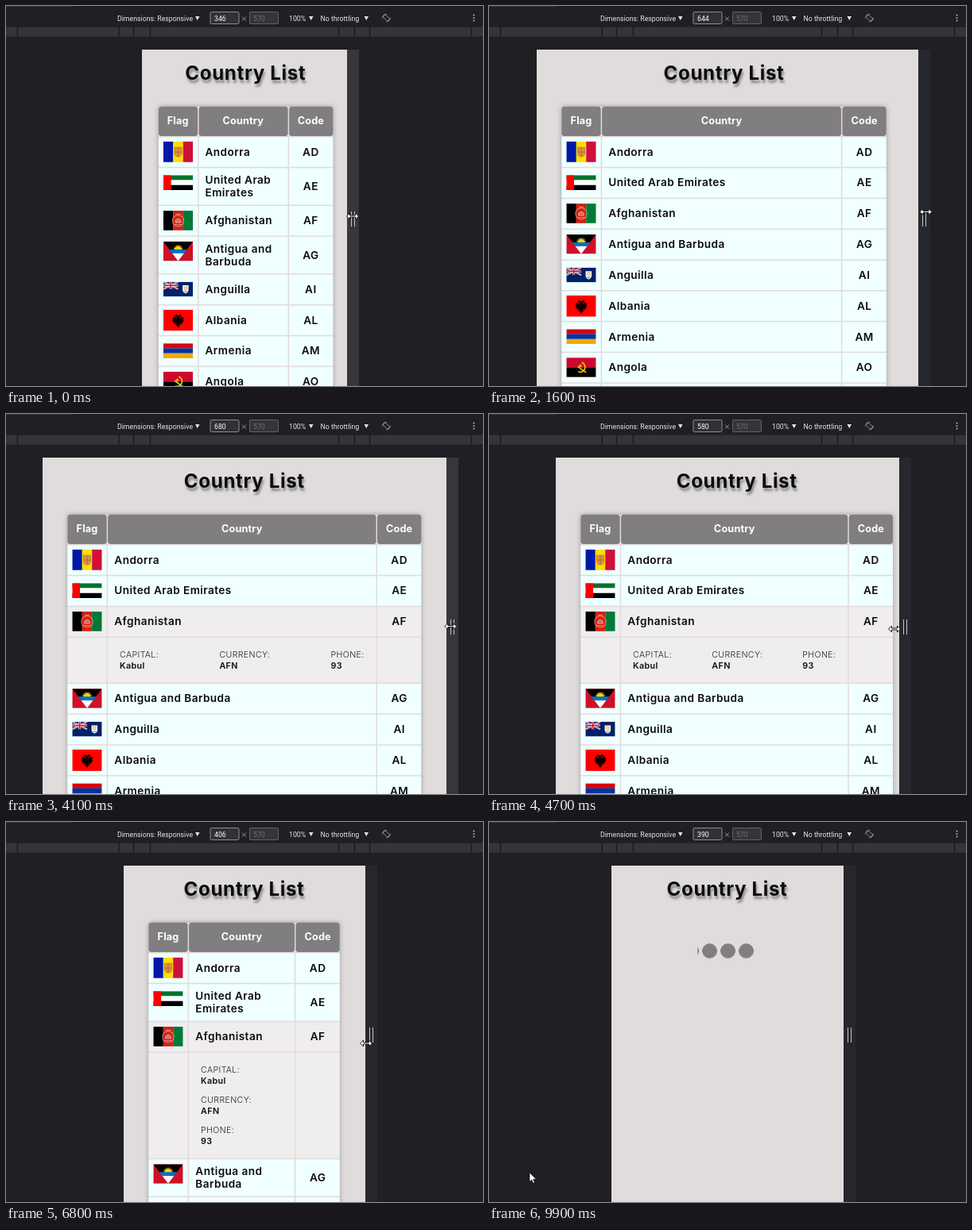
Animation of 600x479 px, one loop 10 s. Source, as an HTML page:

```html
<!DOCTYPE html>
<html lang="en">
<head>
<meta charset="utf-8">
<title>Country List</title>
<style>
  html, body { margin: 0; width: 100%; height: 100%; overflow: hidden; background: #201f24; }
  #stage { position: relative; width: 600px; height: 479px; overflow: hidden; background: #201f24; }
  #bar { position: absolute; left: 0; top: 0; font: 8.75px Roboto, sans-serif; }
  #panel { position: absolute; top: 55px; height: 424px; overflow: hidden; background: #e0dcdb; }
  #page { position: relative; transform: scale(.7465); transform-origin: 0 0; height: 570px;
    font: 600 18.2px/21px Inter, sans-serif; letter-spacing: .6px; color: #0c0c0e; }
  h1 { position: absolute; top: 20px; width: 100%; margin: 0; text-align: center; white-space: nowrap;
    font-size: 32.4px; line-height: 40px; font-weight: 700; letter-spacing: .8px;
    text-shadow: 2px 5px 4px rgba(50, 55, 70, .5); }
  #list { position: absolute; top: 95.5px; display: grid; gap: 2px; box-shadow: 0 0 9px rgba(0, 0, 0, .3); border-radius: 5px; }
  .row { display: grid; grid-template-columns: 66px minmax(0, 1fr) 74px; gap: 2px; }
  .row > div { min-height: 50px; box-sizing: border-box; background: #f0ffff; display: flex; align-items: center; }
  .row > .flag { align-items: flex-start; justify-content: center; }
  .flag span { height: 50px; display: flex; align-items: center; }
  .row > .name { padding: 10px 8px 10px 11px; }
  .row > .code { justify-content: center; }
  .head > div { background: #807e81 !important; color: #fff; border-radius: 5px; justify-content: center;
    font-weight: 700; font-size: 17px; letter-spacing: .2px; }
  .open > div, .info > div { background: #efedee; }
  .hover > div { background: #d0e7ee; }
  .row > .facts { padding: 20px; flex-wrap: wrap; justify-content: space-between; align-content: flex-start; gap: 15px;
    font-size: 14.4px; line-height: 18px; letter-spacing: .5px; }
  .facts small { display: block; font-size: 14.2px; font-weight: 300; color: #222; }
  #loader { position: absolute; top: 131px; left: 50%; width: 100px; height: 26px; margin-left: -50px;
    background: radial-gradient(circle 12.7px, #807e81 96%, transparent) 0 0 / 30.8px 26px; }
  #grip { position: absolute; top: 55px; width: 15px; height: 424px; }
  #grip::after { content: ""; position: absolute; left: 5px; top: 204px; width: 3px; height: 19px;
    border: solid #c4c6c8; border-width: 0 1px; }
  #pointer { position: absolute; left: 0; top: 0; overflow: visible; }
</style>
</head>
<body>
<div id="stage">
  <svg id="bar" width="600" height="55">
    <path d="M0 0H85" stroke="#2e2f33" stroke-width="2"/>
    <path d="M85 0H600" stroke="#19191c" stroke-width="2"/>
    <rect y="26.5" width="600" height="12" fill="#333539"/>
    <path d="M14.500 26V39M142 26V39M160.500 26V39M181.500 26V39M418.500 26V39M438.500 26V39M457.500 26V39M585.500 26V39" stroke="#1b1b1f" stroke-width="1.5"/>
    <g fill="#e4e6e8">
      <text x="140" y="18.5">Dimensions: Responsive</text>
      <text x="356" y="18.5">100%</text>
      <text x="395.5" y="18.5">No throttling</text>
      <path d="M238 13h5.500l-2.750 5zM381 13h5.500l-2.750 5zM450.500 13h5.500l-2.750 5z"/>
    </g>
    <rect x="257" y="7.5" width="36" height="15" rx="1.5" fill="#303135" stroke="#8c8d90"/>
    <rect x="306.5" y="7.5" width="36" height="15" rx="1.5" fill="#353539" stroke="#626266"/>
    <text id="size" x="262" y="18.5" fill="#fff"></text>
    <text x="311" y="18.5" fill="#707074">570</text>
    <path d="M297 13.500l5 5m0-5l-5 5" stroke="#96989b"/>
    <g fill="none" stroke="#9b9da0" stroke-width=".9">
      <rect x="476.3" y="11" width="4.400" height="8" rx="1" transform="rotate(-45 478.5 15)"/>
      <path d="M473.700 15.500a4.800 4.800 0 0 1 5-5.300M483.300 14.500a4.800 4.800 0 0 1-5 5.300"/>
    </g>
    <g fill="#b5b7ba"><circle cx="588.5" cy="11.5" r="1"/><circle cx="588.5" cy="15" r="1"/><circle cx="588.5" cy="18.5" r="1"/></g>
  </svg>
  <div id="panel">
    <div id="page">
      <h1>Country List</h1>
      <div id="list"></div>
      <div id="loader"></div>
    </div>
  </div>
  <div id="grip"></div>
  <svg id="pointer" width="1" height="1">
    <path id="resize" d="M-7.500 0l4-4v3h7v-3l4 4-4 4v-3h-7v3z" fill="#fff" stroke="#000" stroke-width=".9" stroke-linejoin="round"/>
    <circle id="touch" r="8" fill="rgba(92,98,104,.8)" stroke="rgba(130,140,146,.75)" stroke-width="1.5"/>
    <path id="arrow" d="M0 0v11.500l2.700-2.500 1.900 4.200 1.900-.9-1.900-4h3.700z" fill="#fff" stroke="#000" stroke-width=".6"/>
  </svg>
</div>
<script>
const $ = id => document.getElementById(id);
const SCALE = 0.7465, LOOP = 10000, STEP = 100, LAG = 130;

// Flag drawing
const rect = (x, y, w, h, fill) => `<rect x="${x}" y="${y}" width="${w}" height="${h}" fill="${fill}"/>`;
const disc = (x, y, r, fill, more = '') => `<circle cx="${x}" cy="${y}" r="${r}" fill="${fill}" ${more}/>`;
const path = (d, fill, more = '') => `<path d="${d}" fill="${fill}" ${more}/>`;
const bars = (...c) => c.map((f, i) => rect(i * 50 / c.length, 0, 50 / c.length + .1, 40, f)).join('');
const bands = (h, ...c) => c.map((f, i) => rect(0, i * h / c.length, 50, h / c.length + .1, f)).join('');
const star = (n, x, y, R, r, fill) => {
  const pts = Array.from({ length: 2 * n }, (_, i) => {
    const a = Math.PI * i / n - Math.PI / 2, d = i % 2 ? r : R;
    return `${(x + d * Math.cos(a)).toFixed(1)},${(y + d * Math.sin(a)).toFixed(1)}`;
  });
  return `<polygon points="${pts.join(' ')}" fill="${fill}"/>`;
};
const line = (color, width) => `stroke="${color}" stroke-width="${width}"`;
const flag = (h, art) => `<svg width="50" height="${h}" viewBox="0 0 50 ${h}">${art}</svg>`;

const flags = {
  AD: flag(35, bars('#0018a8', '#fedd00', '#d0103a') +
    path('M19 10h12v10q0 5-6 6-6-1-6-6z', '#d69a3c', line('#b9752f', 1.2)) + path('M25 11v14M20 18h10', 'none', line('#c7503c', 1.2))),
  AE: flag(25, bands(25, '#00732f', '#fff', '#000') + rect(0, 0, 13, 25, '#f00')),
  AF: flag(33, bars('#000', '#d32011', '#007a36') +
    disc(25, 17, 9.5, 'none', line('#ec9c92', 1.6) + ' stroke-dasharray="2 .8"') +
    path('M20.500 20v-4q4.500-5 9 0v4zM19 23.500h12M21 6h8', '#dd6a5e', line('#f3c4bd', .9))),
  AG: flag(33, rect(0, 0, 50, 33, '#ce1126') + '<clipPath id="vee"><path d="M0 0H50L25 33z"/></clipPath><g clip-path="url(#vee)">' +
    rect(0, 0, 50, 14, '#000') + star(16, 25, 14, 9.5, 5.5, '#fcd116') +
    rect(0, 13.5, 50, 7, '#0072c6') + rect(0, 20, 50, 13, '#fff') + '</g>'),
  AI: flag(25, rect(0, 0, 50, 25, '#012169') +
    path('M0 0L25 12.500M25 0L0 12.500', 'none', line('#fff', 2.6)) + path('M0 0L25 12.500M25 0L0 12.500', 'none', line('#c8102e', .9)) +
    path('M12.500 0V12.500M0 6.250H25', 'none', line('#fff', 4)) + path('M12.500 0V12.500M0 6.250H25', 'none', line('#c8102e', 2.2)) +
    path('M32.500 6h10v7q0 5-5 7-5-2-5-7z', '#fff') + path('M34 15h7q-1 3-3.500 4-2.500-1-3.500-4z', '#7ec4dc') +
    disc(37.5, 10.5, 2.4, 'none', line('#f19b32', 1.4))),
  AL: flag(36, rect(0, 0, 50, 36, '#f00') +
    path('M25 11l-3-3-4 3 4 1 1 3-4-3-4 2 2 2-2 2 2 2-1 2 3 0-1 3 4-2-1 4 2 0 2 4 2-4 2 0-1-4 4 2-1-3 3 0-1-2 2-2-2-2 2-2-4-2-4 3 1-3 4-1-4-3z', '#120000')),
  AM: flag(25, bands(25, '#d90012', '#0033a0', '#f2a800')),
  AO: flag(33, bands(33, '#cc092f', '#000') +
    path('M26 8a8.500 8.500 0 1 1-6 16M19 15l14 10', 'none', line('#ffcb00', 2.2)) + star(5, 23.5, 14, 3.6, 1.5, '#ffcb00')),
  AQ: flag(33, rect(0, 0, 50, 33, '#3a7dce') + disc(25, 17, 8, '#fff')),
};

const names = ['Andorra', 'United Arab Emirates', 'Afghanistan', 'Antigua and Barbuda', 'Anguilla',
  'Albania', 'Armenia', 'Angola', 'Antarctica'];
const row = (cls, a, b, c) => `<div class="row ${cls}">${a}${b}${c}</div>`;
const cell = (cls, html) => `<div class="${cls}">${html}</div>`;
const fact = (label, value) => `<span><small>${label}:</small>${value}</span>`;

$('list').innerHTML = row('head', cell('', 'Flag'), cell('', 'Country'), cell('', 'Code')) +
  Object.keys(flags).map((code, i) =>
    row(code, cell('flag', `<span>${flags[code]}</span>`), cell('name', names[i]), cell('code', code)) +
    (code === 'AF' ? row('info', cell('', ''), cell('facts', fact('CAPITAL', 'Kabul') + fact('CURRENCY', 'AFN') + fact('PHONE', '93')), cell('', '')) : '')
  ).join('');
const picked = document.querySelector('.AF'), info = document.querySelector('.info');

// Motion: [time, value...]
const widths = [[-130, 349], [0, 346], [100, 350], [770, 526], [900, 558], [1100, 595], [1900, 673], [2150, 680],
  [4150, 680], [4400, 656], [4570, 610], [4700, 580], [5100, 520], [5570, 470], [5700, 444], [6100, 420], [6500, 406],
  [6900, 406], [7500, 390]];
const trail = [[0, 436, 265], [100, 440, 264], [900, 525, 258], [1100, 537, 257], [2100, 562, 262], [2300, 561, 266],
  [2500, 450, 80], [2700, 375, 249], [3400, 375, 249], [3700, 430, 255], [4000, 560, 267], [4150, 559, 268],
  [4400, 545, 269], [4700, 510, 271], [5700, 465, 277], [6500, 453, 279], [6900, 453, 279], [7700, 447, 281],
  [8000, 380, 340], [8350, 110, 440], [8600, 80, 250], [8800, 74, -20], [9500, 70, -20], [9900, 51, 442]];

function at(keys, t) {
  const n = keys.findIndex(k => k[0] > t);
  if (n < 0) return keys[keys.length - 1].slice(1);
  if (n === 0) return keys[0].slice(1);
  const a = keys[n - 1], b = keys[n], u = (t - a[0]) / (b[0] - a[0]);
  return a.slice(1).map((v, i) => v + (b[i + 1] - v) * u);
}
const within = (t, a, b) => t >= a && t < b;
const show = (el, on) => { el.style.display = on ? '' : 'none'; };

function draw(t) {
  const [width] = at(widths, t), [layout] = at(widths, t - LAG), [x, y] = at(trail, t);
  const half = width * SCALE / 2, right = 300 + half;

  $('size').textContent = Math.round(width);
  $('panel').style.left = 300 - half + 'px';
  $('panel').style.width = 2 * half + 'px';
  $('page').style.width = layout + 'px';
  $('list').style.left = $('list').style.right = (layout < 376 ? 27.5 : 42) + 'px';
  $('grip').style.left = right + 'px';
  $('grip').style.background = t < 100 || within(t, 2200, 2400) || within(t, 4000, 4200) ? '#35373b' : '#26282d';

  const loading = t >= 9400, open = within(t, 2700, 9400);
  show($('list'), !loading);
  show($('loader'), loading);
  $('loader').style.backgroundPositionX = 5.1 + (t - 9900) / 1000 * 30.8 + 'px';
  picked.classList.toggle('open', open);
  picked.classList.toggle('hover', within(t, 2700, 3900));
  show(info, open);

  const sizing = t < 2400 || within(t, 4000, 7800);
  const inside = Math.abs(x - 300) < half && y > 55;
  show($('resize'), sizing);
  show($('touch'), !sizing && inside);
  show($('arrow'), !sizing && !inside);
  $('pointer').style.transform = `translate(${x}px, ${y}px)`;
}

const start = performance.now();
function tick() {
  const t = (performance.now() - start) % LOOP;
  draw(Math.floor(t / STEP) * STEP);
  requestAnimationFrame(tick);
}
tick();
</script>
</body>
</html>
```
